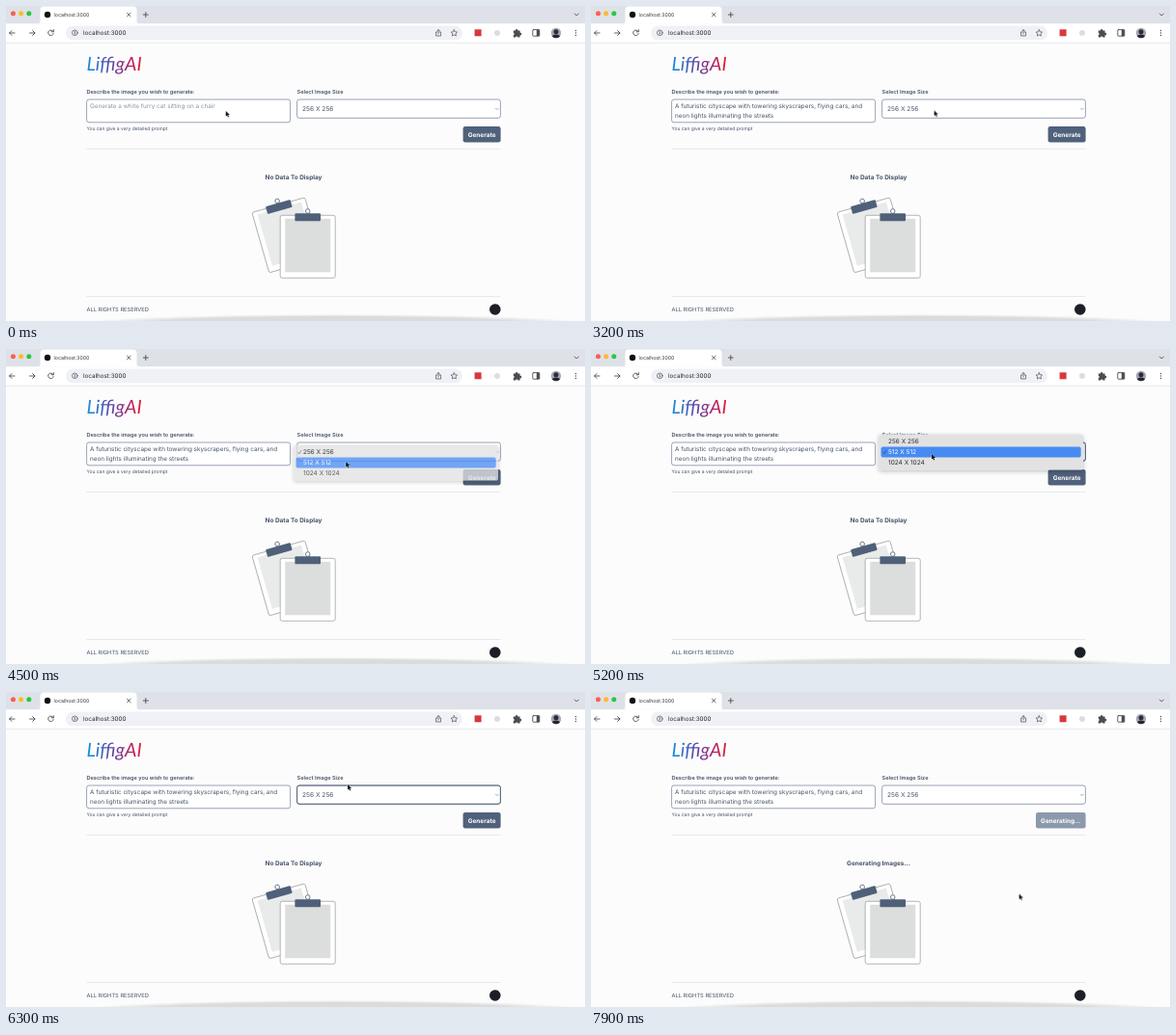
An HTML page that plays this animation: 600 px wide and 327 px high, repeating every 8 s.

```html
<!DOCTYPE html>
<html lang="en">
<head>
<meta charset="utf-8">
<title>Image generator</title>
<style>
html, body { margin: 0; width: 100%; height: 100%; overflow: hidden; background: #fcfcfc; }
svg { display: block; width: 600px; height: 327px; }
text { font-family: Inter, "Open Sans", sans-serif; text-rendering: geometricPrecision; fill: #455368; }
.label { font-size: 5.62px; font-weight: 600; }
.field { font-size: 6.35px; }
.size { font-size: 6.65px; }
.item { font-size: 6.5px; fill: #2c2c2e; }
.strong { font-size: 6.45px; font-weight: 700; }
.white { fill: #fff; }
.logo { font: italic 400 19.7px Lato, sans-serif; fill: url(#ink); }
.icon { fill: none; stroke: #4a4d52; stroke-width: .9; stroke-linecap: round; stroke-linejoin: round; }
.fine { stroke-width: .7; }
.box { fill: #fff; stroke: #7f8ca2; stroke-width: .8; }
.focus { fill: none; stroke: #4d5b76; stroke-width: .9; }
.rule { stroke: #e0e3e8; stroke-width: .8; }

/* every part runs on the same 8 s clock; 1% = 80 ms */
[class*="t-"] { animation: 8s step-end infinite; }
.t-hint { animation-name: hint; }
.t-prompt { animation-name: prompt; }
.t-ring { animation-name: ring; }
.t-ring2 { animation-name: ring2; }
.t-caret { animation-name: caret; }
.t-small { animation-name: small; }
.t-mid { animation-name: mid; }
.t-menu1 { animation-name: menu1; animation-timing-function: linear; }
.t-menu2 { animation-name: menu2; }
.t-a1 { animation-name: a1; }
.t-b1 { animation-name: b1; }
.t-a2 { animation-name: a2; }
.t-b2 { animation-name: b2; }
.t-c2 { animation-name: c2; }
.t-idle { animation-name: idle; }
.t-hover { animation-name: hover; }
.t-busy { animation-name: busy; }
.t-move { animation-name: move; animation-timing-function: ease-in-out; }
.t-arrow { animation-name: arrow; }
.t-beam { animation-name: beam; }
.t-hand { animation-name: hand; }

@keyframes hint { 0% { opacity: 1 } 12.5%, 100% { opacity: 0 } }
@keyframes prompt { 0% { opacity: 0 } 12.5%, 100% { opacity: 1 } }
@keyframes ring { 0% { opacity: 0 } 2.5% { opacity: 1 } 38.5%, 100% { opacity: 0 } }
@keyframes caret { 0% { opacity: 0 } 12.5% { opacity: 1 } 38.5%, 100% { opacity: 0 } }
@keyframes ring2 { 0% { opacity: 0 } 57.4% { opacity: 1 } 90%, 100% { opacity: 0 } }
@keyframes small { 0% { opacity: 1 } 56.9% { opacity: 0 } 77.8%, 100% { opacity: 1 } }
@keyframes mid { 0% { opacity: 0 } 56.9% { opacity: 1 } 77.8%, 100% { opacity: 0 } }
@keyframes menu1 { 0%, 42.49% { opacity: 0 } 42.5%, 55.2% { opacity: 1 } 56.25% { opacity: .78 } 57.4%, 100% { opacity: 0 } }
@keyframes menu2 { 0% { opacity: 0 } 65% { opacity: 1 } 77.8%, 100% { opacity: 0 } }
@keyframes a1 { 0% { opacity: 1 } 50%, 100% { opacity: 0 } }
@keyframes b1 { 0% { opacity: 0 } 50%, 100% { opacity: 1 } }
@keyframes a2 { 0% { opacity: 0 } 75%, 100% { opacity: 1 } }
@keyframes b2 { 0% { opacity: 1 } 70% { opacity: 0 } 74% { opacity: 1 } 75%, 100% { opacity: 0 } }
@keyframes c2 { 0% { opacity: 0 } 70% { opacity: 1 } 74%, 100% { opacity: 0 } }
@keyframes idle { 0% { opacity: 1 } 90%, 100% { opacity: 0 } }
@keyframes hover { 0% { opacity: 0 } 82.5% { opacity: 1 } 90%, 100% { opacity: 0 } }
@keyframes busy { 0% { opacity: 0 } 90%, 100% { opacity: 1 } }
@keyframes move {
  0%, 1.3% { transform: translate(227.7px, 109px) }
  3.7%, 28.7% { transform: translate(217px, 108px) }
  37.5%, 47.5% { transform: translate(355.6px, 108.5px) }
  52.5%, 58.7% { transform: translate(352.2px, 117px) }
  62.5%, 68.7% { transform: translate(353px, 109px) }
  71.2%, 72.5% { transform: translate(353px, 112.5px) }
  76.2%, 78.7% { transform: translate(354px, 96px) }
  84%, 91.2% { transform: translate(486.3px, 138px) }
  96.5%, 100% { transform: translate(443.6px, 209.6px) }
}
@keyframes arrow { 0% { opacity: 1 } 2.5% { opacity: 0 } 33.4% { opacity: 1 } 82.5% { opacity: 0 } 90%, 100% { opacity: 1 } }
@keyframes beam { 0% { opacity: 0 } 2.5% { opacity: 1 } 33.4%, 100% { opacity: 0 } }
@keyframes hand { 0% { opacity: 0 } 82.5% { opacity: 1 } 90%, 100% { opacity: 0 } }
</style>
</head>
<body>
<svg viewBox="0 0 600 327">
  <defs>
    <linearGradient id="ink" gradientUnits="userSpaceOnUse" x1="84" y1="0" x2="143" y2="0">
      <stop offset="0" stop-color="#1290e0"/>
      <stop offset=".5" stop-color="#6a3a9c"/>
      <stop offset=".8" stop-color="#c02058"/>
      <stop offset="1" stop-color="#e8202c"/>
    </linearGradient>
    <radialGradient id="dusk">
      <stop offset=".75" stop-opacity=".13"/>
      <stop offset="1" stop-opacity="0"/>
    </radialGradient>
    <filter id="shade" x="-10%" y="-30%" width="120%" height="170%">
      <feDropShadow dx="0" dy="1.5" stdDeviation="2" flood-opacity=".25"/>
    </filter>
    <clipPath id="face"><circle cx="570" cy="28" r="5.2"/></clipPath>
    <g id="list">
      <rect x="298.3" y="-7.6" width="211.7" height="37.2" rx="2.6" fill="#e2e2e3" filter="url(#shade)"/>
      <text class="item" x="308" y="2.3">256 X 256</text>
      <text class="item" x="308" y="13.3">512 X 512</text>
      <text class="item" x="308" y="24.3">1024 X 1024</text>
    </g>
    <rect id="pick" x="300.5" y="-5.4" width="207.2" height="10.8" rx="2" fill="#478bf2"/>
    <path id="tick" class="icon fine" d="M302.8 .4 303.9 1.8 305.9 -1.7"/>
    <g id="board">
      <rect width="57" height="65" rx="2" fill="#fff" stroke="#6b6c70" stroke-width=".5"/>
      <rect x="5" y="3.5" width="47" height="55.5"/>
      <circle cx="28.5" cy="-4.3" r="2.3" fill="#fff" stroke="#4f6079" stroke-width=".8"/>
      <rect x="15.2" y="-2" width="26.6" height="8" rx="1" fill="#4f6079"/>
    </g>
  </defs>

  <!-- browser bar -->
  <rect width="600" height="18.5" fill="#dee1e7"/>
  <rect y="18.4" width="600" height="19.6" fill="#fff"/>
  <path d="M32 18.6q3.5 0 3.5-3.5V4q0-3.5 3.5-3.5h93q3.5 0 3.5 3.5v11q0 3.5 3.5 3.5z" fill="#fff"/>
  <circle cx="7.4" cy="7.8" r="2.5" fill="#fb5d56"/>
  <circle cx="15.6" cy="7.8" r="2.5" fill="#fcbb2e"/>
  <circle cx="23.8" cy="7.8" r="2.5" fill="#2ac740"/>
  <circle cx="43" cy="9" r="3.2" fill="#111"/>
  <text x="49.6" y="11" font-size="5.2" style="fill:#333">localhost:3000</text>
  <path class="icon" d="M125.5 7.2l3.6 3.6m0-3.6l-3.6 3.6M142.3 9h5m-2.5-2.5v5M589.3 8l2 2 2-2"/>
  <path class="icon" d="M9 28H3.5m2.4-2.4L3.5 28l2.4 2.4M24.5 28H30m-2.4-2.4L30 28l-2.4 2.4"/>
  <path class="icon" d="M49 26.6a2.8 2.8 0 1 0 .2 2M49.3 24.6v2.2h-2.2"/>
  <rect x="62" y="20.5" width="411" height="14.8" rx="7.4" fill="#eff1f6"/>
  <circle class="icon fine" cx="71.3" cy="27.8" r="2.8"/>
  <path class="icon" d="M71.3 27.6v1.5m0-2.7v.1"/>
  <text x="80" y="30" font-size="6.3" style="fill:#26282c">localhost:3000</text>
  <path class="icon fine" d="M446.8 27h-1.2v4h5v-4h-1.2M448.1 29v-4.3m-1.4 1.3l1.4-1.4 1.4 1.4"/>
  <path class="icon fine" d="M464.4 24.7l1 2.1 2.3.3-1.7 1.6.4 2.3-2-1.1-2 1.1.4-2.3-1.7-1.6 2.3-.3z"/>
  <rect x="485.6" y="24.3" width="7" height="7" fill="#d8383c"/>
  <circle cx="509" cy="28" r="3" fill="#dcdde0"/>
  <path d="M525.8 25.6h2.1a1.3 1.3 0 1 1 2.5 0h2.2v2.2a1.3 1.3 0 1 1 0 2.5v2.1h-2.1a1.3 1.3 0 0 0-2.5 0h-2.2v-2.2a1.3 1.3 0 0 0 0-2.5z" fill="#4a4d52"/>
  <rect class="icon" x="545.8" y="24.6" width="7" height="6.6" rx=".6"/>
  <rect x="549.8" y="24.6" width="3" height="6.6" fill="#4a4d52"/>
  <g clip-path="url(#face)">
    <rect x="564" y="22" width="12" height="12" fill="#a4a9b6"/>
    <circle cx="570" cy="26.8" r="2.5" fill="#2e2d35"/>
    <ellipse cx="570" cy="33" rx="4.8" ry="3.6" fill="#26262e"/>
  </g>
  <g fill="#4a4d52"><circle cx="590.5" cy="25.5" r=".7"/><circle cx="590.5" cy="28" r=".7"/><circle cx="590.5" cy="30.5" r=".7"/></g>
  <path d="M0 38.2h600" class="rule"/>

  <!-- form -->
  <text class="logo" x="83.5" y="67">LiffigAI</text>
  <text class="label" x="83.5" y="90.5">Describe the image you wish to generate:</text>
  <text class="label" x="301.5" y="90.5">Select Image Size</text>
  <rect class="box" x="83.6" y="97" width="211" height="23.8" rx="2.4"/>
  <rect class="focus t-ring" x="83.6" y="97" width="211" height="23.8" rx="2.4"/>
  <text class="field t-hint" x="87" y="106.4" style="fill:#8b95a5">Generate a white furry cat sitting on a chair</text>
  <g class="t-prompt">
    <text class="field" x="87" y="106.4">A futuristic cityscape with towering skyscrapers, flying cars, and</text>
    <text class="field" x="87" y="116.4">neon lights illuminating the streets</text>
  </g>
  <path class="t-caret" d="M191.2 110.6v7" stroke="#333d4e" stroke-width=".6"/>
  <text x="83.5" y="128.7" font-size="4.95">You can give a very detailed prompt</text>

  <rect class="box" x="301.6" y="97" width="210.8" height="19.3" rx="2.4"/>
  <rect class="focus t-ring2" x="301.6" y="97" width="210.8" height="19.3" rx="2.4"/>
  <text class="size t-small" x="307" y="109.2">256 X 256</text>
  <text class="size t-mid" x="307" y="109.2">512 X 512</text>
  <path class="icon fine" d="M507.6 106.3l1.3 1.3 1.3-1.3" style="stroke:#7d8594"/>

  <g class="t-idle">
    <rect x="473.6" y="125" width="39" height="16.5" rx="2.3" fill="#50617b"/>
    <rect class="t-hover" x="473.6" y="125" width="39" height="16.5" rx="2.3" fill="#36435a"/>
    <text class="strong white" x="493.1" y="135.7" text-anchor="middle">Generate</text>
  </g>
  <g class="t-busy">
    <rect x="461" y="125" width="51.6" height="16.5" rx="2.3" fill="#8c98ab"/>
    <text class="strong white" x="486.8" y="135.7" text-anchor="middle">Generating...</text>
  </g>
  <path class="rule" d="M83.5 148.4h429M83.5 301.5h429"/>

  <!-- empty state -->
  <text class="strong t-idle" x="298" y="179.6" text-anchor="middle">No Data To Display</text>
  <text class="strong t-busy" x="298" y="179.6" text-anchor="middle">Generating Images...</text>
  <use href="#board" transform="translate(254.9 214.4) rotate(-15.9)" fill="#e9eaea"/>
  <use href="#board" transform="translate(284.2 217.3)" fill="#dcdddd"/>

  <text x="83.5" y="317.2" font-size="5.75">ALL RIGHTS RESERVED</text>
  <circle cx="506.8" cy="315" r="5.8" fill="#1c2026"/>
  <ellipse cx="340" cy="330" rx="265" ry="10" fill="url(#dusk)"/>

  <!-- size menus -->
  <g class="t-menu1"><g transform="translate(0 107)">
    <use href="#list"/>
    <g class="t-a1"><use href="#pick"/><text class="item white" x="308" y="2.3">256 X 256</text></g>
    <g class="t-b1"><use href="#pick" y="11"/><text class="item white" x="308" y="13.3">512 X 512</text></g>
    <use href="#tick"/>
  </g></g>
  <g class="t-menu2"><g transform="translate(0 96)">
    <use href="#list"/>
    <g class="t-a2"><use href="#pick"/><text class="item white" x="308" y="2.3">256 X 256</text></g>
    <g class="t-b2"><use href="#pick" y="11"/><text class="item white" x="308" y="13.3">512 X 512</text></g>
    <g class="t-c2"><use href="#pick" y="22"/><text class="item white" x="308" y="24.3">1024 X 1024</text></g>
    <use href="#tick" y="11"/>
  </g></g>

  <!-- pointer -->
  <g class="t-move">
    <path class="t-arrow" d="M0 0v5.6l1.3-1.2.9 2.1 1-.4-.9-2.1h1.8z" fill="#111" stroke="#fff" stroke-width=".5" paint-order="stroke"/>
    <path class="t-beam" d="M-1.3-3.4q1.3 0 1.3 1v4.8q0 1-1.3 1M1.3-3.4q-1.3 0-1.3 1m0 4.8q0 1 1.3 1M-.7.9h1.4" fill="none" stroke="#222" stroke-width=".6"/>
    <path class="t-hand" d="M-.6 4.6V.6a.7.7 0 0 1 1.4 0v2l2.6.6q.9.3.8 1.3l-.5 2.8H.2l-2.1-2.6q-.5-.9.4-.9z" fill="#fff" stroke="#222" stroke-width=".6" stroke-linejoin="round"/>
  </g>
</svg>
</body>
</html>
```
